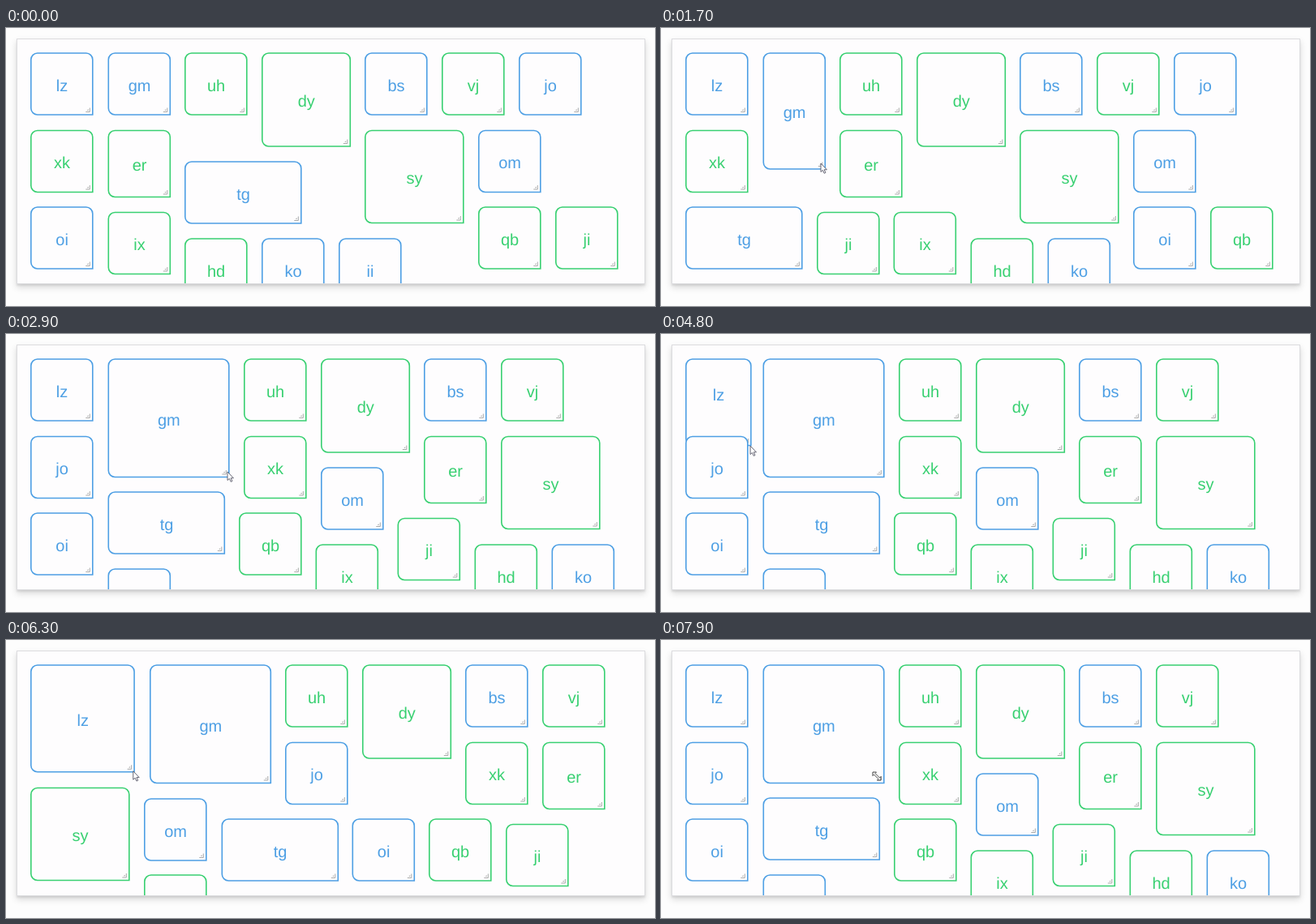
Write an HTML page that moves like this. It is 800 px wide and 343 px high and loops after 8 s.

```html
<!DOCTYPE html>
<html lang="en">
<head>
<meta charset="utf-8">
<title>Resizable grid</title>
<style>
  html, body { margin: 0; width: 100%; height: 100%; overflow: hidden; background: #fdfdfd; }
  #panel {
    position: absolute; left: 13px; top: 13px; width: 773px; height: 301px;
    background: #fefdfe; border: 1px solid #dcdcdf;
    box-shadow: 0 2px 2px rgba(0,0,0,.08), 0 4px 8px rgba(0,0,0,.15);
  }
  svg { position: absolute; left: 0; top: 0; }
  text {
    font: 20px "Liberation Sans", Arial, sans-serif;
    text-anchor: middle; text-rendering: geometricPrecision;
  }
</style>
</head>
<body>
<div id="panel"></div>
<svg id="stage" width="800" height="343" viewBox="0 0 800 343">
  <clipPath id="clip"><rect x="14" y="14" width="773" height="301"/></clipPath>
  <g id="items" clip-path="url(#clip)"></g>
  <path id="arrow" d="M0 0V10.5L2.4 8.4L4.2 12.3L5.9 11.5L4.2 7.8H7.4Z" fill="#fff" stroke="#556" stroke-width=".9"/>
  <path id="sizer" d="M-5-5H-.5L-2-3.5L3.5 2L5 .5V5H.5L2 3.5L-3.5-2L-5-.5Z" fill="#fff" stroke="#333" stroke-width=".9"/>
</svg>
<script>
const LOOP = 8000, BLUE = "#4d9fe4", GREEN = "#38d071", S = 77.5;
const $ = id => document.getElementById(id);

// Stacking order; sizes other than S x S are listed below.
const names = "lz gm uh dy bs vj jo xk er sy om tg oi qb ji ix hd ko ii".split(" ");
const blue = "lz gm bs jo om tg oi ko ii".split(" ");
const sizes = { dy: [110, 116.5], er: [S, 83.5], sy: [122.5, 115.5], tg: [144.5, S] };

const start = {
  lz: [30, 30], gm: [125.5, 30], uh: [220, 30], dy: [315, 30], bs: [442, 30], vj: [537, 30], jo: [632, 30],
  xk: [30, 125.5], er: [125.5, 125.5], sy: [442, 125.5], om: [582, 125.5], tg: [220, 164],
  oi: [30, 220], qb: [582, 220], ji: [677, 220], ix: [125.5, 226.5],
  hd: [220, 259], ko: [315, 259], ii: [410, 259]
};
const tall = {
  ...start, er: [220, 125.5], tg: [30, 220], ji: [192, 226.5], ix: [286.5, 226.5],
  hd: [381.5, 259], ko: [476.5, 259], oi: [582, 220], qb: [677, 220], ii: [192, 321]
};
const wide = {
  ...start, uh: [293, 30], dy: [388, 30], bs: [515, 30], vj: [610, 30],
  jo: [30, 125.5], xk: [293, 125.5], er: [515, 125.5], sy: [610, 125.5],
  om: [388, 164], tg: [125.5, 194], oi: [30, 220], qb: [287, 220], ji: [482.5, 226.5],
  ix: [381.5, 259], hd: [577.5, 259], ko: [672.5, 259], ii: [125.5, 289]
};
const pushed = {
  ...wide, gm: [177, 30], uh: [344, 30], dy: [439, 30], bs: [566, 30], vj: [661, 30],
  jo: [344, 125.5], xk: [566, 125.5], er: [661, 125.5], sy: [30, 181.5], om: [170, 195],
  tg: [265.5, 220], oi: [426.5, 220], qb: [521, 220], ji: [616, 226.5],
  ix: [170, 289], hd: [30, 315], ko: [265.5, 315], ii: [360, 315]
};
const moves = [[1300, tall], [2500, wide], [5451, pushed], [6601, wide]];
const MOVE_MS = 300;

// Keys: time, then values
const drags = {
  gm: [[850, S, S], [1250, S, 144.5], [2000, S, 144.5], [2450, 150, 147]],
  lz: [[4600, S, S], [4700, 81.5, 85.5], [4800, 81.5, 108], [5400, 129, 133.5],
       [6300, 129, 133.5], [6550, S, S]]
};
const pointer = [
  [800, 200, 101], [1250, 197, 167], [2000, 197, 167], [2450, 273, 170], [3400, 273, 170],
  [4300, 103, 103], [4600, 105, 105], [4700, 109, 115], [4800, 110, 138], [5400, 157, 162],
  [6300, 157, 162], [6600, 85, 91], [7200, 85, 91], [7800, 266, 168]
];

const mix = (a, b, p) => a.map((v, i) => v + (b[i] - v) * p);

function at(keys, t) {
  const n = keys.findIndex(k => k[0] > t);
  if (n < 0) return keys[keys.length - 1].slice(1);
  if (!n) return keys[0].slice(1);
  const a = keys[n - 1], b = keys[n];
  return mix(a, b, (t - a[0]) / (b[0] - a[0])).slice(1);
}

// cubic-bezier(.25, .1, .25, 1)
function ease(x) {
  if (x <= 0) return 0;
  if (x >= 1) return 1;
  const curve = (u, a, b) => 3 * u * (1 - u) * ((1 - u) * a + u * b) + u ** 3;
  let lo = 0, hi = 1;
  for (let i = 0; i < 20; i++) {
    const mid = (lo + hi) / 2;
    if (curve(mid, .25, .25) < x) lo = mid; else hi = mid;
  }
  return curve(lo, .1, 1);
}

function place(name, t) {
  let pos = start[name];
  for (const [begin, layout] of moves) pos = mix(pos, layout[name], ease((t - begin) / MOVE_MS));
  return pos;
}

const sizeOf = (name, t) => drags[name] ? at(drags[name], t) : sizes[name] || [S, S];

// Rounded on every corner except the one with the handle
function outline(w, h, r = 8) {
  const arc = (x, y) => `a${r} ${r} 0 0 1 ${x} ${y}`;
  return `M${r} 0H${w - r}${arc(r, r)}V${h}H${r}${arc(-r, -r)}V${r}${arc(r, -r)}Z`;
}

function add(parent, tag, attrs) {
  const el = document.createElementNS("http://www.w3.org/2000/svg", tag);
  for (const k in attrs) el.setAttribute(k, attrs[k]);
  return parent.appendChild(el);
}

const items = names.map(name => {
  const color = blue.includes(name) ? BLUE : GREEN;
  const g = add($("items"), "g", {});
  const box = add(g, "path", { fill: "#fefdfe", stroke: color, "stroke-width": 1.6 });
  const label = add(g, "text", { fill: color });
  const grip = add(g, "path", { d: "M-3.5-8.5V-3.5H-8.5M-5.5-6.5V-5.5H-6.5", fill: "none", stroke: "#aaa" });
  label.textContent = name;
  return { name, g, box, label, grip };
});

const shift = (el, x, y) => el.setAttribute("transform", `translate(${x} ${y})`);

function draw(t) {
  for (const { name, g, box, label, grip } of items) {
    const [x, y] = place(name, t), [w, h] = sizeOf(name, t);
    const [lw, lh] = sizeOf(name, t - 100); // the label follows slightly late
    shift(g, x + .8, y + 1);
    box.setAttribute("d", outline(w - 1.5, h - 1.5));
    shift(label, lw / 2 - .5, lh / 2 + 8);
    shift(grip, w - 1.5, h - 1.5);
  }
  const [px, py] = at(pointer, t);
  const onGrip = t >= 7800 || (t >= 4300 && t < 4600);
  $("arrow").style.display = t >= 800 && !onGrip ? "" : "none";
  $("sizer").style.display = onGrip ? "" : "none";
  shift($("arrow"), px, py);
  shift($("sizer"), px, py);
}

const begin = performance.now();
function tick() {
  draw((performance.now() - begin) % LOOP);
  requestAnimationFrame(tick);
}
tick();
</script>
</body>
</html>
```
